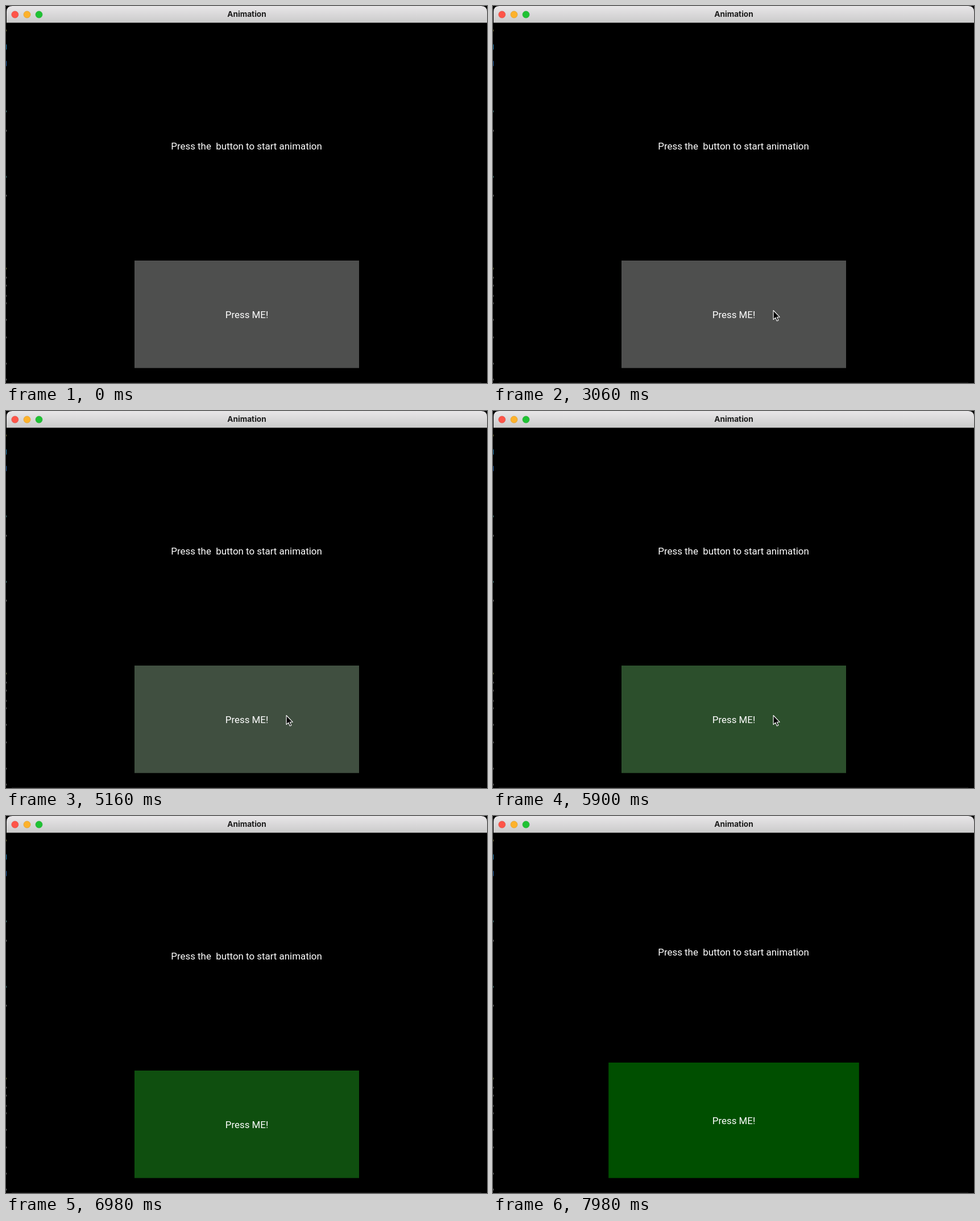
An HTML page for the animation above (8 s loop, 846 px wide and 662 px high).

```html
<!DOCTYPE html>
<html lang="en">
<head>
<meta charset="utf-8">
<title>Animation</title>
<style>
  html, body { margin: 0; width: 100%; height: 100%; overflow: hidden; background: #000; }
  svg { display: block; width: 846px; height: 662px; }
  text { fill: #fff; font: 16.9px Roboto, sans-serif; text-anchor: middle; white-space: pre; }
  .title { fill: #1c1c1c; font: 700 13.7px Inter, sans-serif; }
</style>
</head>
<body>
<svg viewBox="0 0 846 662">
  <defs>
    <linearGradient id="bar" x2="0" y2="1">
      <stop offset="0" stop-color="#e8e6e8"/>
      <stop offset="1" stop-color="#cbcbcb"/>
    </linearGradient>
  </defs>
  <rect width="846" height="662" fill="#000"/>
  <g id="edge"></g>
  <path d="M1 29V10Q1 0 11 0H836Q846 0 846 10V29Z" fill="url(#bar)"/>
  <path d="M1 29.5H846" stroke="#9a9a9a" stroke-opacity=".5"/>
  <path d="M10 661.5H836" stroke="#1c1c1c"/>
  <g stroke-width=".6">
    <circle cx="15.8" cy="15" r="6" fill="#fe5549" stroke="#d9443a"/>
    <circle cx="37" cy="15" r="6" fill="#fdb22c" stroke="#d99722"/>
    <circle cx="58" cy="15" r="6" fill="#20c234" stroke="#19a42a"/>
  </g>
  <text class="title" x="423.5" y="19">Animation</text>
  <text id="label" x="423">Press the  button to start animation</text>
  <rect id="button"/>
  <text id="caption" x="423.5">Press ME!</text>
  <path id="cursor" d="M.5 .5V16.6L4.2 13.2 6.7 19 9.3 17.9 6.8 12.2H11.6Z"
        fill="#000" stroke="#fff" stroke-width="1.1" stroke-linejoin="round"/>
</svg>
<script>
const LOOP = 8000;
const PRESS = 4640, RELEASE = 4860, GROW = 7520;
const BOTTOM = 635.7, CENTER = 423.5;
const get = id => document.getElementById(id);
const [label, button, caption, cursor] = ['label', 'button', 'caption', 'cursor'].map(get);

const set = (el, attrs) => {
  for (const key in attrs) el.setAttribute(key, attrs[key]);
};
const progress = (t, from, to) => Math.min(1, Math.max(0, (t - from) / (to - from)));
const smooth = u => u * u * (3 - 2 * u);
const mix = (a, b, u) => a + (b - a) * u;

// Slivers of the window behind, visible along the left edge.
const specks = [[43, '#77713a'], [72, '#278bc0', 9], [101, '#2565b0', 9], [185, '#4d8b8b'],
  [219, '#888'], [300, '#4d8b8b'], [333, '#888'], [461, '#777743'], [477, '#777'],
  [491, '#777'], [509, '#666'], [522, '#666'], [551, '#777'], [582, '#777'], [628, '#777'], [656, '#777']];
get('edge').innerHTML = specks.map(([y, color, h = 3]) =>
  `<rect y="${y - h / 2}" width="1" height="${h}" fill="${color}"/>`).join('');

function drawButton(t) {
  const grow = Math.max(0, t - GROW) / 460;
  const width = 395 + 45.5 * grow;
  const height = 188.7 + 14 * grow;
  const tint = 1 - progress(t, PRESS, GROW);
  const pressed = t >= PRESS && t < RELEASE;
  const [r, g, b] = pressed ? [35, 152, 216] : [78, 79, 78];
  set(button, {
    x: CENTER - width / 2, y: BOTTOM - height, width, height,
    fill: `rgb(${r * tint}, ${g}, ${b * tint})`
  });
  set(label, { y: 251.8 - 7 * grow });
  set(caption, { y: 547.6 - 7 * grow });
}

function drawCursor(t) {
  const arrive = smooth(progress(t, 1440, 2320));
  const leave = smooth(progress(t, 6120, 6600));
  const x = mix(mix(847, 492.6, arrive), 850, leave);
  const y = mix(mix(480, 534, arrive), 505, leave);
  set(cursor, { transform: `translate(${x} ${y})` });
}

function frame(now) {
  const t = now % LOOP;
  drawButton(t);
  drawCursor(t);
  requestAnimationFrame(frame);
}
frame(0);
</script>
</body>
</html>
```
